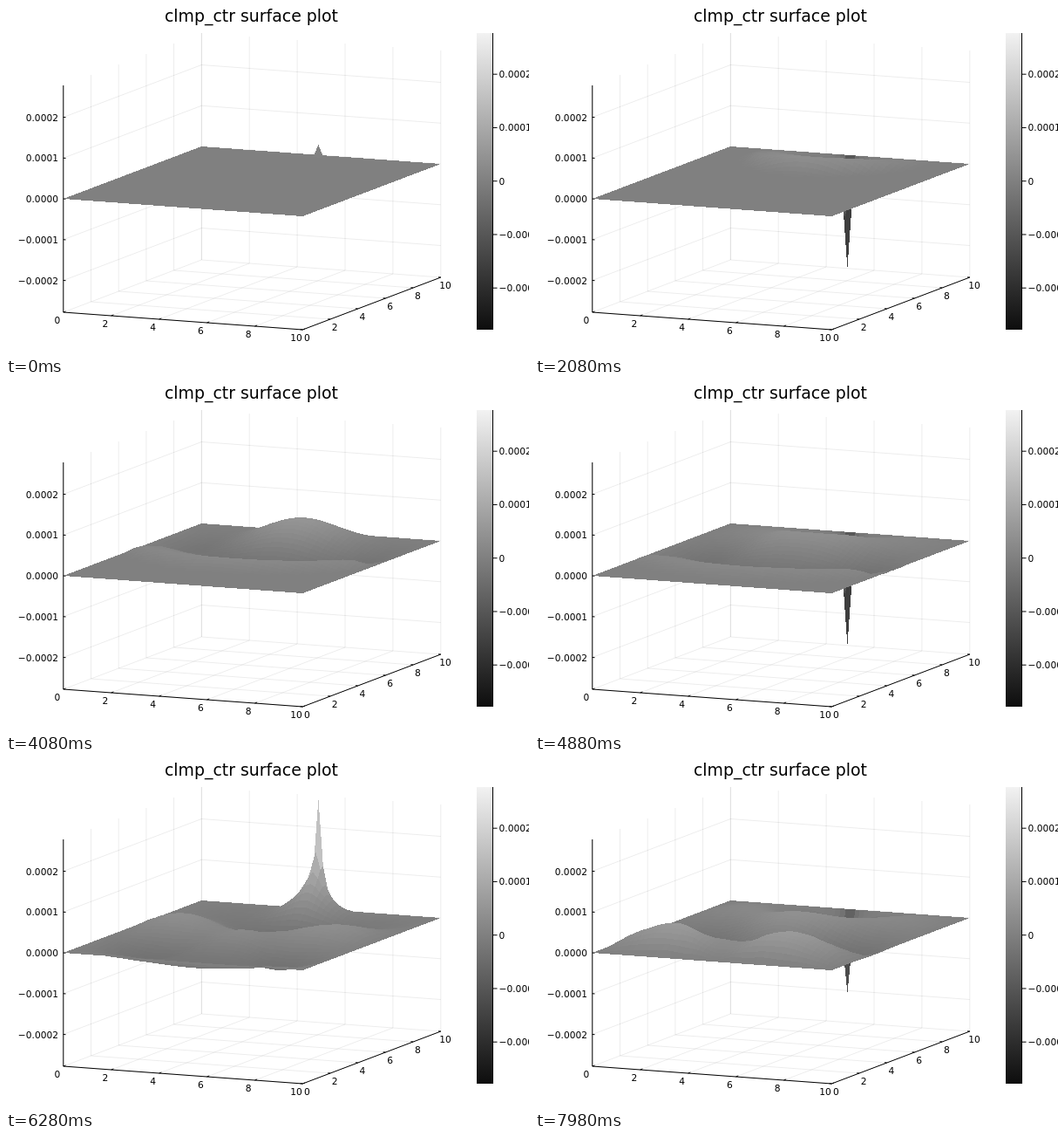
Animation of 600 by 400 pixels, one loop 8 s. Source, as an HTML page with a canvas:

```html
<!DOCTYPE html>
<html lang="en">
<head>
<meta charset="utf-8">
<title>Surface plot</title>
<style>
  html, body { margin: 0; width: 600px; height: 400px; overflow: hidden; background: #fff; }
  svg, canvas { position: absolute; left: 0; top: 0; }
  text { font-family: "DejaVu Sans", sans-serif; font-size: 10.67px; }
</style>
</head>
<body>
<svg id="axes" width="600" height="400">
  <defs>
    <linearGradient id="grays" x1="0" y1="1" x2="0" y2="0">
      <stop offset="0" stop-color="rgb(13,13,13)"/>
      <stop offset="1" stop-color="rgb(242,242,242)"/>
    </linearGradient>
  </defs>
  <text x="281.5" y="18" text-anchor="middle" style="font-size:18.9px">clmp_ctr surface plot</text>
  <rect x="540" y="31" width="18.5" height="340" fill="url(#grays)"/>
</svg>
<canvas id="surface" width="600" height="400"></canvas>
<script>
const Z_LIMIT = 130;       // half height of the box in px
const PEAK = 128;          // height of the driven point in px
const CELLS = 50, SIZE = CELLS + 1;
const COURANT = 0.425;
const SOURCE = 49 * SIZE + 25;
const LOOP = 8000, FRAMES = 172;

// Plot coordinates (x, y in 0..10, z in px) to the stage.
const project = (x, y, z) => [65.8 + 27.45 * x + 15.85 * y, 221 + 2 * x - 6 * y - z];

// ---- axes ----
const svg = document.getElementById("axes");

function add(tag, attributes, content = "") {
  const node = document.createElementNS("http://www.w3.org/2000/svg", tag);
  for (const key in attributes) node.setAttribute(key, attributes[key]);
  node.textContent = content;
  svg.append(node);
}
const path = (points, stroke) =>
  add("path", { d: "M" + points.map(p => p.join()).join("L"), stroke, fill: "none" });
const grid = (...points) => path(points.map(p => project(...p)), "rgba(0,0,0,.075)");
const axis = (...points) => path(points.map(p => project(...p)), "#000");
const label = (x, y, content, anchor = "middle") =>
  add("text", { x, y, "text-anchor": anchor }, content);

for (let v = 0; v <= 10; v += 2) {
  grid([v, 0, -Z_LIMIT], [v, 10, -Z_LIMIT], [v, 10, Z_LIMIT]);
  grid([10, v, -Z_LIMIT], [0, v, -Z_LIMIT], [0, v, Z_LIMIT]);
}
for (let k = -2; k <= 2; k++) {
  const z = k * 46.75, name = (k < 0 ? "\u2212" : "") + "0.000" + Math.abs(k);
  grid([0, 0, z], [0, 10, z], [10, 10, z]);
  axis([0, 0, z], [0.1, 0, z]);
  label(60, 225 - z, name, "end");
  const barY = 200.7 - k * 61.25;
  path([[558.5, barY], [563.5, barY]], "#000");
  label(565.5, barY + 4, k ? name : "0", "start");
}
for (let v = 0; v <= 10; v += 2) {
  axis([v, 0, -Z_LIMIT], [v, 0.17, -Z_LIMIT]);
  axis([10, v, -Z_LIMIT], [9.9, v, -Z_LIMIT]);
  label(59 + 27.4 * v, 364.4 + 2 * v, v);
  label(345.5 + 15.85 * v, 384.4 - 6 * v, v);
}
axis([0, 0, Z_LIMIT], [0, 0, -Z_LIMIT], [10, 0, -Z_LIMIT], [10, 10, -Z_LIMIT]);
path([[558.5, 31], [558.5, 371]], "#000");

// ---- wave equation with clamped edges and one driven point ----
function simulate() {
  const fields = [];
  let before = new Float64Array(SIZE * SIZE), now = before;
  for (let n = 0; n < FRAMES; n++) {
    const next = new Float64Array(SIZE * SIZE);
    for (let j = 1; j < CELLS; j++) for (let i = 1; i < CELLS; i++) {
      const p = j * SIZE + i;
      const laplacian = now[p - 1] + now[p + 1] + now[p - SIZE] + now[p + SIZE] - 4 * now[p];
      next[p] = 2 * now[p] - before[p] + COURANT ** 2 * laplacian;
    }
    next[SOURCE] = Math.sin((n + 1) * Math.PI / 30);
    fields.push(next);
    before = now;
    now = next;
  }
  return fields;
}

// ---- hard-edged drawing, back to front ----
const context = document.getElementById("surface").getContext("2d");
const image = context.createImageData(600, 400);
const pixels = new Uint32Array(image.data.buffer);

function fillPolygon(points, color) {
  const xs = points.map(p => p[0]);
  const last = Math.max(...xs) - 0.5;
  for (let column = Math.ceil(Math.min(...xs) - 0.5); column < last; column++) {
    const x = column + 0.5, crossings = [];
    points.forEach((a, k) => {
      const b = points[(k + 1) % points.length];
      if ((a[0] <= x) !== (b[0] <= x))
        crossings.push(a[1] + (b[1] - a[1]) * (x - a[0]) / (b[0] - a[0]));
    });
    crossings.sort((a, b) => a - b);
    for (let k = 0; k + 1 < crossings.length; k += 2)
      for (let row = Math.ceil(crossings[k] - 0.5); row < crossings[k + 1] - 0.5; row++)
        pixels[row * 600 + column] = color;
  }
}

function drawSurface(field) {
  pixels.fill(0);
  const step = 10 / CELLS;
  const vertices = Array.from(field, (z, p) =>
    project(p % SIZE * step, Math.floor(p / SIZE) * step, z * PEAK));
  for (let j = CELLS - 1; j >= 0; j--) for (let i = 0; i < CELLS; i++) {
    const p = j * SIZE + i;
    const corners = [p, p + 1, p + SIZE + 1, p + SIZE];
    const mean = corners.reduce((sum, c) => sum + field[c], 0) / 4;
    const gray = Math.round(127.5 + 114.75 * mean * PEAK / Z_LIMIT);
    fillPolygon(corners.map(c => vertices[c]), 0xff000000 | gray * 0x10101);
  }
  context.putImageData(image, 0, 0);
}

// Frames are held for 20, 100 and 20 ms in turn.
function frameAt(time) {
  const rest = time % 140;
  return 3 * Math.floor(time / 140) + (rest < 20 ? 0 : rest < 120 ? 1 : 2);
}

const fields = simulate();
const start = performance.now();
let shown = -1;

function tick() {
  const frame = frameAt((performance.now() - start) % LOOP);
  if (frame !== shown) drawSurface(fields[shown = frame]);
  requestAnimationFrame(tick);
}
tick();
</script>
</body>
</html>
```
